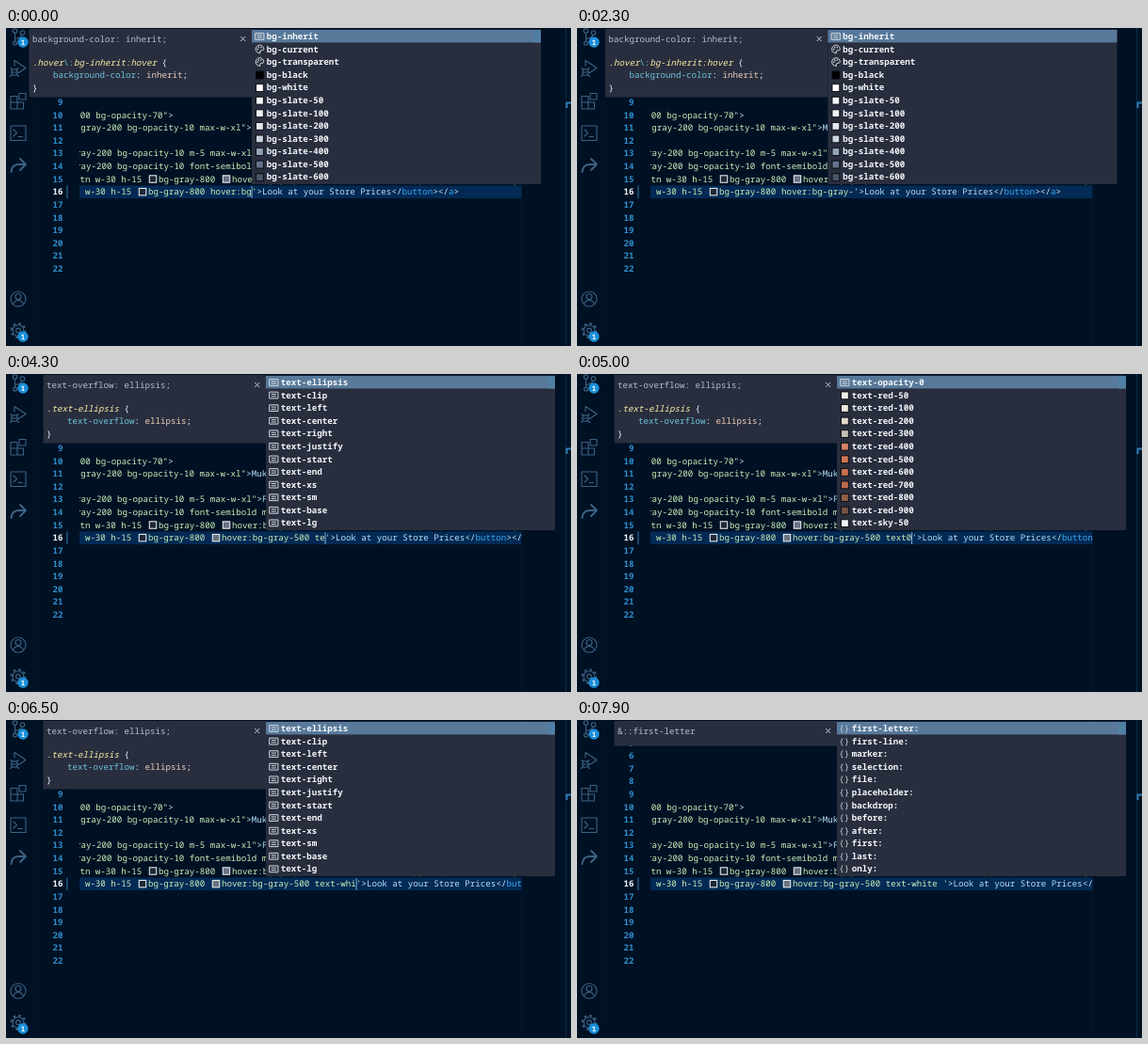
Recreate the animation shown at these times as an HTML page. Size 600 px wide and 338 px high, loop 8 s.

```html
<!DOCTYPE html>
<html lang="en">
<head>
<meta charset="utf-8">
<title>Editor</title>
<style>
html, body { margin: 0; width: 100%; height: 100%; overflow: hidden; background: #001124; }
svg { display: block; width: 600px; height: 338px; }
text { font: 500 9.167px "Noto Sans Mono", "DejaVu Sans Mono", monospace; white-space: pre; text-rendering: geometricPrecision; }
.icon { fill: none; stroke: #3c6384; stroke-width: 1.1; stroke-linejoin: round; stroke-linecap: round; }
</style>
</head>
<body>
<svg viewBox="0 0 600 338">
  <defs><clipPath id="pane"><rect x="78" width="469.5" height="338"/></clipPath></defs>
  <rect width="600" height="338" fill="#001124"/>
  <path d="M30 0V338M547.5 0V338" stroke="#051a30" stroke-width=".8"/>
  <path d="M594.500 0V338" stroke="#0c2c49"/>
  <path d="M600 79.500H595.500V85" fill="none" stroke="#2f7db3" stroke-width="2"/>
  <g class="icon">
    <circle cx="9.5" cy="3" r="2.3"/><circle cx="17.5" cy="5" r="2.3"/><path d="M9.5 5.5V15M17 7.5Q15 11 9.5 11.5"/><circle cx="9.5" cy="16" r="2"/>
    <path d="M9 40V34.5L21 42.5L13.5 47.5"/><circle cx="9" cy="47" r="3.2"/><path d="M5.8 47H12.2M5 42.5L7 44.5M13 42.5L11 44.5M4.5 51.5L6.5 49.5M13.5 51.5L11.5 49.5"/>
    <path d="M5 72.5H12V86H5ZM5 79H18.500V86H12M14 69.500H21V76H14Z"/>
    <path d="M5 104H21V119.500H5ZM8 108L11.500 111.500L8 115M13 115.500H17.500"/>
    <path d="M15 139L21 145L15 151M21 145H13Q6 145.500 5.500 153" stroke-width="1.900"/>
    <circle cx="13" cy="288" r="8"/><circle cx="13" cy="285.500" r="3"/><path d="M7.500 293.500Q9 289.500 13 289.500T18.500 293.500"/>
    <circle cx="13" cy="321.500" r="2.400"/><circle cx="13" cy="321.500" r="5.800"/><circle cx="13" cy="321.500" r="7.400" stroke-width="1.900" stroke-linecap="butt" stroke-dasharray="2.700 3.112"/>
  </g>
  <g id="badges"></g>
  <g id="nums"></g>
  <g id="scene"></g>
</svg>
<script>
const CW = 5.5, LOOP = 8000;
const C = { str: '#c9efb9', text: '#b5e0fc', tag: '#3ba6ee', punc: '#c4ebfb', ui: '#f3f6fa',
  dim: '#b7bec9', sel: '#fbeea6', prop: '#6cc3dd', val: '#eccdb9', panel: '#292e3e' };
const el = id => document.getElementById(id);
const esc = s => s.replace(/&/g, '&amp;').replace(/</g, '&lt;');
const rowY = n => 78.9 + 13.62 * (n - 9);
const rect = (x, y, w, h, fill, more = '') =>
  `<rect x="${x}" y="${y}" width="${w}" height="${h}" fill="${fill}" ${more}/>`;
const text = (x, y, s, fill, more = '') =>
  `<text x="${x}" y="${y + 3.1}" fill="${fill}" ${more}>${esc(s)}</text>`;

// A run is [text, colour]; a run without text is a colour swatch.
function runs(x, y, list) {
  let out = '';
  for (const [s, fill, more] of list) {
    if (s) {
      out += text(x, y, s, fill, more);
      x += s.length * CW;
    } else {
      out += rect(x + 2.4, y - 3.8, 7.4, 7.4, fill, 'stroke="#e4e9ee" stroke-width="1.1"');
      x += 12;
    }
  }
  return { out, x };
}

const close = tag => [['</', C.punc], [tag, C.tag], ['>', C.punc]];
const attr = s => [[s + '"', C.str], ['>', C.punc]];
const LINES = [
  [10, 73.2, attr('300 bg-opacity-70')],
  [11, 79.2, [...attr('gray-200 bg-opacity-10 max-w-xl'), ['Mukbe', C.text], ...close('h2')]],
  [13, 74, [...attr('ray-200 bg-opacity-10 m-5 max-w-xl'), ['Find the best prices for ingredients at the stores', C.text]]],
  [14, 74, [...attr('ray-200 bg-opacity-10 font-semibold mx-5 max-w-xl'), ['What would you like to do?', C.text], ...close('h3')]],
  [15, 78.4, [['tn w-30 h-15 ', C.str], ['', '#1f2937'], ['bg-gray-800 ', C.str], ['', '#6b7280'],
    ['hover:bg-gray-500 ', C.str], ['', '#ffffff'], ["text-white m-5 py-2 px-4 rounded-lg'", C.str]]]
].map(([n, x, list]) => runs(x, rowY(n), list).out).join('');

// Each item is [icon or swatch colour, label].
const slate = ['f8fafc', 'f1f5f9', 'e2e8f0', 'cbd5e1', '94a3b8', '64748b', '475569'];
const red = ['f3efe8', 'efe8dc', 'e1d7c8', 'c6bdb7', 'd58364', 'd07655', 'c96f50', 'bd6b4e', '925d47', '795243'];
const step = i => i ? i * 100 : 50;
const MENUS = {
  bg: [['abc', 'bg-inherit'], ['pal', 'bg-current'], ['pal', 'bg-transparent'], ['#000', 'bg-black'], ['#fff', 'bg-white'],
    ...slate.map((c, i) => ['#' + c, 'bg-slate-' + step(i)])],
  red: [['abc', 'text-opacity-0'], ...red.map((c, i) => ['#' + c, 'text-red-' + step(i)]), ['#f0f6fa', 'text-sky-50']],
  text: 'ellipsis clip left center right justify start end xs sm base lg'.split(' ').map(s => ['abc', 'text-' + s]),
  pseudo: 'first-letter first-line marker selection file placeholder backdrop before after first last only'
    .split(' ').map(s => ['{}', s + ':'])
};
const DOCS = {
  inherit: ['background-color', 'inherit', [['.hover', 1], ['\\:', 0], ['bg-inherit:hover', 1]]],
  ellipsis: ['text-overflow', 'ellipsis', [['.text-ellipsis', 1]]],
  opacity: ['--tw-text-opacity', '0', [['.text-opacity-0', 1]]],
  letter: ['&::first-letter']
};

function itemIcon(kind, x, y) {
  if (kind === '{}') return text(x - 6, y, kind, '#c9d0d8');
  if (kind === 'abc')
    return `<path d="M${x - 4.6} ${y - 3.4}h9.200v6.800h-9.200zM${x - 2.6} ${y - 1.1}h5.200m-5.200 2.300h5.200" fill="none" stroke="#d3dae2"/>`;
  if (kind === 'pal') {
    const dots = [[-2, 0], [-1, -2], [1.5, -1.8]].map(([a, b]) => `<circle cx="${x + a}" cy="${y + b}" r=".8" fill="#d3dae2"/>`).join('');
    return `<path d="M${x + .5} ${y + 4.2}a4.300 4.300 0 1 1 4 -4.200q-.3 1.500 -2.500 1.200t-1.500 3z" fill="none" stroke="#d3dae2"/>` + dots;
  }
  return rect(x - 3.8, y - 3.6, 7.8, 7.8, kind, 'stroke="#05070c" stroke-width=".9"');
}

// Bold the letters of the label that match the query in order.
function label(s, hit, x, y) {
  let i = 0;
  const list = [];
  for (const ch of s) {
    const on = ch === hit[i];
    if (on) i++;
    const last = list[list.length - 1];
    if (last && last.on === on) last[0] += ch;
    else list.push(Object.assign([ch, C.ui, `style="font-weight:${on ? 800 : 600}"`], { on }));
  }
  return runs(x, y, list).out;
}

function menu({ menu: name, x, hit, thumb }) {
  let out = rect(x, 1.5, 307, 164.5, C.panel) + rect(x, 2, 307, 13.4, '#58799a');
  if (thumb) out += rect(x + 299, 2, 8, 13.4, '#4f7fa3');
  MENUS[name].forEach(([kind, s], i) => {
    const y = 9 + i * 13.58;
    out += itemIcon(kind, x + 8.3, y) + label(s, hit, x + 15.8, y);
  });
  return out;
}

function doc(name, x) {
  const [prop, val, sel] = DOCS[name];
  const left = x - 236.5, tx = left + 3.6;
  let out = rect(left, 1, 236.5, val ? 72.5 : 26.5, C.panel) +
    text(tx, 12, val ? `${prop}: ${val};` : prop, C.dim) +
    `<path d="M${x - 11.8} 9l5 5m0 -5l-5 5" stroke="#c3c9d1"/>`;
  if (val) {
    const head = sel.map(([s, on]) => [s, on ? C.sel : C.prop, on ? 'style="font-style:italic"' : '']);
    out += runs(tx, 37, [...head, [' {', C.ui]]).out +
      runs(tx + 4 * CW, 50, [[prop, C.prop], [': ', C.ui], [val, C.val], [';', C.ui]]).out +
      text(tx, 63.4, '}', C.ui);
  }
  return out;
}

// State changes; every step keeps what it does not name.
const G = 'hover:bg-gray-500 ';
const STEPS = [
  [0, { code: 'hover:bg', menu: 'bg', doc: 'inherit', x: 261, hit: 'bg', cur: 1, sw: 0, thumb: 1 }],
  [100, { cur: 0 }],
  [400, { code: 'hover:bg-', cur: 1 }],
  [500, { x: 266.5, hit: 'bg-' }],
  [1100, { code: 'hover:bg-g' }],
  [1300, { code: 'hover:bg-gr' }],
  [1400, { code: 'hover:bg-gra', thumb: 0 }],
  [1800, { code: 'hover:bg-gray' }],
  [1900, { code: 'hover:bg-gray-' }],
  [2300, { cur: 0 }],
  [2600, { code: 'hover:bg-gray-5', cur: 1 }],
  [2700, { menu: '', doc: '' }],
  [3600, { code: 'hover:bg-gray-500' }],
  [3900, { code: G, sw: 1 }],
  [4000, { menu: 'pseudo', doc: 'letter', x: 276, hit: '', thumb: 1 }],
  [4200, { code: G + 't' }],
  [4300, { code: G + 'te', menu: 'text', doc: 'ellipsis', hit: 'te' }],
  [4500, { code: G + 'tex', hit: 'tex' }],
  [4700, { code: G + 'text', hit: 'text' }],
  [4900, { code: G + 'text0' }],
  [5000, { menu: 'red', hit: 'text0' }],
  [5200, { doc: 'opacity' }],
  [5700, { code: G + 'text' }],
  [5800, { menu: 'text', hit: 'text' }],
  [6000, { doc: 'ellipsis' }],
  [6300, { code: G + 'text-', hit: 'text-' }],
  [6400, { code: G + 'text-wh' }],
  [6500, { code: G + 'text-whi' }],
  [6700, { code: G + 'text-whit' }],
  [6900, { code: G + 'text-white' }],
  [7200, { menu: '', doc: '' }],
  [7300, { code: G + 'text-white ' }],
  [7400, { menu: 'pseudo', doc: 'letter', hit: '' }],
  [7600, { cur: 0 }]
];

function draw(s) {
  const y = rowY(16);
  const typed = runs(78.4, y, [[' w-30 h-15 ', C.str], ['', '#1f2937'], ['bg-gray-800 ', C.str],
    ...(s.sw ? [['', '#6b7280']] : []), [s.code, C.str]]);
  const rest = runs(typed.x, y, [["'", C.str], ['>', C.punc], ['Look at your Store Prices', C.text], ...close('button'), ...close('a')]);
  const caret = s.cur ? rect(typed.x - .3, y - 6, 1, 12.6, '#7fb4dc') : '';
  el('scene').innerHTML = `<g clip-path="url(#pane)">${LINES}${typed.out}${rest.out}${caret}</g>` +
    (s.doc ? doc(s.doc, s.x) : '') + (s.menu ? menu(s) : '');
}

el('badges').innerHTML = [15, 328].map(y => `<circle cx="18" cy="${y}" r="5.700" fill="#1a8fd8"/>` +
  text(18, y, '1', '#fff', 'text-anchor="middle" style="font-size:7.500px;font-weight:700"')).join('');
let nums = rect(78, rowY(16) - 6.8, 469.5, 13.6, '#022a55') + rect(64, rowY(16) - 6.8, 1.8, 13.6, '#1a4d72');
for (let n = 3; n <= 22; n++)
  nums += text(60.5, rowY(n), String(n), n === 16 ? '#f0f6fb' : '#2f8ecb', 'text-anchor="end" style="font-weight:600"');
el('nums').innerHTML = nums;

let shown = -1;
function frame() {
  const t = performance.now() % LOOP;
  const n = STEPS.filter(([at]) => at <= t).length;
  if (n !== shown) {
    shown = n;
    draw(Object.assign({}, ...STEPS.slice(0, n).map(s => s[1])));
  }
  requestAnimationFrame(frame);
}
frame();
</script>
</body>
</html>
```
